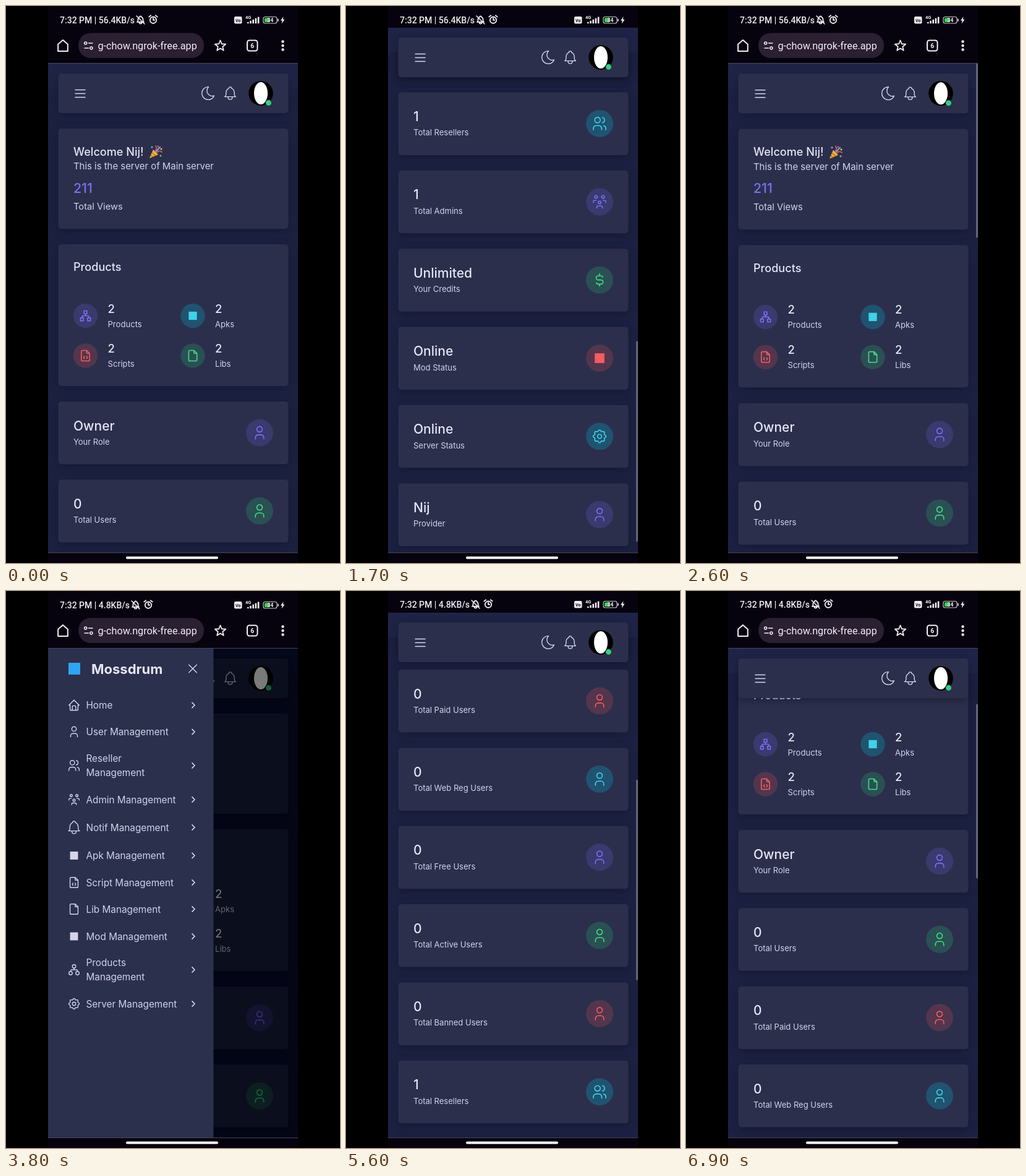
An HTML page that plays this animation: 540x900 px, repeating every 7 s.

```html
<!DOCTYPE html>
<html lang="en">
<head>
<meta charset="utf-8">
<title>Server dashboard</title>
<style>
  html, body { margin: 0; width: 100%; height: 100%; overflow: hidden; background: #000; }
  svg { display: block; }
  #stage { width: 100vw; height: 100vh; }
  text { font-family: Inter, "Open Sans", sans-serif; fill: #d2d2ea; }
  .system text { font-family: Roboto, sans-serif; fill: #f1edf5; }
  .title { fill: #e6e5f8; font-weight: 500; }
  .card { fill: #2b2f4b; filter: drop-shadow(0 3px 7px rgba(9, 11, 34, .45)); }
  .icon { fill: none; stroke-linecap: round; stroke-linejoin: round; }
</style>
</head>
<body>
<svg id="stage" viewBox="0 0 540 900"></svg>
<script>
const LOOP = 7000, STEP = 100;
const VIEW_TOP = 93, VIEW_BOTTOM = 883, BAR_HEIGHT = 58, CONTENT_HEIGHT = 2220;
const OWNER = 'Nij', BRAND = 'Mossdrum', LIGHT = '#d5d4ea';

const tones = {
  purple: ['#7a70f5', '#3a3a6e'],
  green: ['#43dd82', '#2a5054'],
  red: ['#f55c61', '#53364d'],
  cyan: ['#40d2ea', '#205370'],
};

const ring = (x, y, r) => `M${x - r} ${y}a${r} ${r} 0 1 0 ${2 * r} 0a${r} ${r} 0 1 0 ${-2 * r} 0`;
const polar = (count, radius, turn = 0) => 'M' + Array.from({ length: count }, (_, i) => {
  const a = i / count * 2 * Math.PI + turn, r = radius(i, a);
  return `${(12 + r * Math.cos(a)).toFixed(2)} ${(12 + r * Math.sin(a)).toFixed(2)}`;
}).join('L') + 'z';
const page = 'M14 3v4a1 1 0 0 0 1 1h4M17 21H7a2 2 0 0 1-2-2V5a2 2 0 0 1 2-2h7l5 5v11a2 2 0 0 1-2 2z';
const node = (x, y) => `M${x} ${y}h5v5h-5z`;
const branches = 'M6 15v-1a2 2 0 0 1 2-2h8a2 2 0 0 1 2 2v1M12 9v3';

// Line icons on a 24 unit grid
const icons = {
  user: ring(12, 7, 4) + 'M6 21v-2a4 4 0 0 1 4-4h4a4 4 0 0 1 4 4v2',
  users: ring(9, 7, 4) + 'M3 21v-2a4 4 0 0 1 4-4h4a4 4 0 0 1 4 4v2M16 3.1a4 4 0 0 1 0 7.8M21 21v-2a4 4 0 0 0-3-3.8',
  group: ring(12, 13, 2) + ring(17, 5, 2) + ring(7, 5, 2) +
    'M8 21v-1a2 2 0 0 1 2-2h4a2 2 0 0 1 2 2v1M17 10h2a2 2 0 0 1 2 2v1M3 13v-1a2 2 0 0 1 2-2h2',
  dollar: 'M16.7 8a3 3 0 0 0-2.7-2h-4a3 3 0 0 0 0 6h4a3 3 0 0 1 0 6h-4a3 3 0 0 1-2.7-2M12 3v3m0 12v3',
  gear: polar(64, (i, a) => 8.3 + Math.cos(8 * a)) + ring(12, 12, 3),
  file: page,
  code: page + 'M10 13l-1 2 1 2M14 13l1 2-1 2',
  sitemap: node(3.5, 15.5) + node(15.5, 15.5) + node(9.5, 3.5) + branches,
  hierarchy: ring(6, 18, 3) + ring(18, 18, 3) + ring(12, 6, 3) + branches,
  bell: 'M10 5a2 2 0 1 1 4 0a7 7 0 0 1 4 6v3a4 4 0 0 0 2 3H4a4 4 0 0 0 2-3v-3a7 7 0 0 1 4-6M9 17v1a3 3 0 0 0 6 0v-1',
  moon: 'M12 3h.4a7.5 7.5 0 0 0 7.9 12.4A9 9 0 1 1 12 3z',
  home: 'M5 12H3l9-9 9 9h-2M5 12v7a2 2 0 0 0 2 2h10a2 2 0 0 0 2-2v-7M9 21v-6a2 2 0 0 1 2-2h2a2 2 0 0 1 2 2v6',
  house: 'M5 10l7-6 7 6v10H5z',
  menu: 'M4 6h16M4 12h16M4 18h16',
  close: 'M18 6L6 18M6 6l12 12',
  chevron: 'M9 6l6 6-6 6',
  star: polar(10, i => i % 2 ? 4.2 : 9.5, -Math.PI / 2),
  alarm: ring(12, 13, 7) + 'M12 9v4h3M3 6l4-3M21 6l-4-3',
  tune: ring(6, 7, 2.5) + 'M12 7h8M4 17h8' + ring(17.5, 17, 2.5),
};

const icon = (name, x, y, scale = 1, color = LIGHT, width = 1.4) => name === 'square'
  ? `<rect x="${x - 7 * scale}" y="${y - 7 * scale}" width="${14 * scale}" height="${14 * scale}" fill="${color}"/>`
  : `<path class="icon" d="${icons[name]}" stroke="${color}" stroke-width="${width / scale}"
      transform="translate(${x} ${y}) scale(${scale}) translate(-12 -12)"/>`;
const text = (x, y, size, content, extra = '') =>
  `<text x="${x}" y="${y}" font-size="${size}" ${extra}>${content}</text>`;
const title = (x, y, size, content) => text(x, y, size, content, 'class="title"');
const rect = (x, y, w, h, fill, r = 0) =>
  `<rect x="${x}" y="${y}" width="${w}" height="${h}" rx="${r}" fill="${fill}"/>`;
const circle = (x, y, r, fill) => `<circle cx="${x}" cy="${y}" r="${r}" fill="${fill}"/>`;
const card = (y, h) => `<rect class="card" x="84.5" y="${y}" width="372" height="${h}" rx="5"/>`;
const badge = (name, tone, x, y, r, scale) =>
  circle(x, y, r, tones[tone][1]) + icon(name, x, y, scale, tones[tone][0], 1.6);

const popper = `<g transform="translate(231 225)">
  <path d="M1 21L7 7l8 8z" fill="#f0b73f"/><path d="M3 16l4 3M5 12l6 5" stroke="#b9672d" stroke-width="1.5"/>
  <path class="icon" d="M10 9c3-2 3-5 1-8M13 12c2-3 5-3 8-1" stroke="#e4505c" stroke-width="2"/>
  <path class="icon" d="M12 10l6-7" stroke="#58b7e8" stroke-width="2"/>
  ${circle(5, 3, 1.5, '#5fb8e6')}${circle(20, 6, 1.5, '#f2c94c')}${circle(19, 17, 1.5, '#63c37a')}${circle(15, 2, 1.2, '#e86a8a')}
</g>`;

const welcome = card(198, 162) + title(109, 241.5, 18.1, `Welcome ${OWNER}!`) + popper +
  text(109, 264, 14.9, 'This is the server of Main server') +
  text(109, 301.5, 21.3, '211', 'style="fill:#7a70f2;font-weight:500"') +
  text(109, 328.5, 14.7, 'Total Views');

const product = (x, y, name, tone, label) => badge(name, tone, x, y, 19.7, .95) +
  title(x + 36, y - 5, 18.5, '2') + text(x + 36, y + 18, 13.1, label);
const products = card(385, 229) + title(109, 428, 18.1, 'Products') +
  product(128.5, 500.5, 'sitemap', 'purple', 'Products') + product(302, 500.5, 'square', 'cyan', 'Apks') +
  product(128.5, 565, 'code', 'red', 'Scripts') + product(302, 565, 'file', 'green', 'Libs');

const stats = [
  ['Owner', 'Your Role', 'user'], ['0', 'Total Users', 'user'],
  ['0', 'Total Paid Users', 'user'], ['0', 'Total Web Reg Users', 'user'],
  ['0', 'Total Free Users', 'user'], ['0', 'Total Active Users', 'user'],
  ['0', 'Total Banned Users', 'user'], ['1', 'Total Resellers', 'users'],
  ['1', 'Total Admins', 'group'], ['Unlimited', 'Your Credits', 'dollar'],
  ['Online', 'Mod Status', 'square'], ['Online', 'Server Status', 'gear'],
  [OWNER, 'Provider', 'user'],
].map(([value, label, name], i) => {
  const y = 639 + i * 126.35, tone = ['purple', 'green', 'red', 'cyan'][i % 4];
  return card(y, 101.5) + title(109, y + 46.5, 21, value) + text(109, y + 70, 13, label) +
    badge(name, tone, 410, y + 50.5, 22, 1.12);
}).join('');

const header = rect(68, 93, 404, 40, '#1f2447') + card(109, 64) +
  icon('menu', 120, 141.5) + icon('moon', 327, 141, 1.15) + icon('bell', 362.5, 141, 1.12) +
  circle(412, 141, 19.8, '#000') + '<ellipse cx="412" cy="141" rx="11" ry="18" fill="#fff"/>' +
  circle(424.5, 156.5, 5.2, '#2b2f4b') + circle(424.5, 156.5, 4.4, '#35d07a');

const menuItem = ([name, y, ...lines]) =>
  icon(name, 110, y, name === 'bell' ? 1.12 : .92) + icon('chevron', 303, y, .68, LIGHT, 1.7) +
  lines.map((line, i) => text(129.5, y + 5.5 + (i - (lines.length - 1) / 2) * 22.5, 15.3, line)).join('');
const drawer = rect(68, 93, 267.5, 791, '#2b304c') + rect(101, 116, 19, 19, '#2fa4f4') +
  text(138, 133.5, 22, BRAND, 'style="font-weight:700;fill:#e6e5f8"') + icon('close', 302, 125.5, 1.05) + [
    ['home', 184.5, 'Home'],
    ['user', 227.5, 'User Management'],
    ['users', 282, 'Reseller', 'Management'],
    ['group', 337, 'Admin Management'],
    ['bell', 382, 'Notif Management'],
    ['square', 427.5, 'Apk Management'],
    ['code', 471, 'Script Management'],
    ['file', 514, 'Lib Management'],
    ['square', 558, 'Mod Management'],
    ['hierarchy', 612, 'Products', 'Management'],
    ['gear', 667, 'Server Management'],
  ].map(menuItem).join('');

const WHITE = '#f1edf5', DARK = '#06030e';
const toolbar = rect(68, 35, 404, 58, DARK) + rect(68, 92, 404, 1, '#46445c') +
  icon('house', 92, 64, 1.12, WHITE, 2) + rect(117, 43.5, 203, 40.5, '#2a2032', 20) +
  icon('tune', 133.5, 64, .8, WHITE, 1.6) + text(148.5, 69.8, 16.2, 'g-chow.ngrok-free.app') +
  icon('star', 346.5, 64.5, .95, WHITE, 1.8) +
  `<rect x="390" y="55.5" width="16.5" height="17" rx="3.5" fill="none" stroke="${WHITE}" stroke-width="2"/>` +
  text(398.2, 68, 10.5, '6', 'text-anchor="middle" font-weight="700"') +
  [57.5, 64, 70.5].map(y => circle(447.5, y, 2.2, WHITE)).join('');

const bars = [0, 1, 2, 3, 4].map(i => rect(390 + i * 4.2, 26 - i * 2.1, 2.6, 2.2 + i * 2.1, WHITE)).join('');
const statusBar = text(87, 28, 14, '', 'id="clock" font-weight="500"') +
  `<g id="alerts">${icon('bell', 217.5, 22.5, .68, WHITE, 1.8)}
    <path class="icon" d="M211 16l13 13" stroke="${WHITE}" stroke-width="1.6"/>
    ${icon('alarm', 238, 22, .75, WHITE, 1.8)}</g>` +
  rect(369, 17, 12.5, 11.5, WHITE, 2) +
  text(375.2, 25.5, 7, 'Vo', 'text-anchor="middle" font-weight="700" style="fill:#111"') +
  text(387, 21, 7.5, '4G', 'font-weight="700"') + bars +
  `<rect x="416" y="17.5" width="22" height="10.5" rx="3" fill="none" stroke="#c9c6d2" stroke-width="1.2"/>` +
  rect(418, 19.3, 8.5, 7, '#3fd256', 1.5) + rect(439, 20.5, 1.8, 4.5, '#c9c6d2', 1) +
  text(427.5, 26, 8.5, '34', 'text-anchor="middle" font-weight="700"') +
  `<path d="M448.5 17l-4.5 6.5h2.6l-.8 5 4.7-6.7h-2.8z" fill="${WHITE}"/>`;

const $ = id => document.getElementById(id);
$('stage').innerHTML = `
  <clipPath id="view"><rect id="viewRect" x="68" width="404"/></clipPath>
  ${rect(0, 0, 540, 900, '#000')}${rect(68, 0, 404, 900, DARK)}
  <g clip-path="url(#view)">
    <g id="backdrop">
      ${rect(68, 0, 404, 900, '#1d2141')}
      <g id="page"><g id="content">${welcome}${products}${stats}</g>${header}</g>
    </g>
    <rect id="thumb" x="469" width="3.2" rx="1" fill="#63677f"/>
    <g id="drawer">${drawer}</g>
  </g>
  <g class="system">
    <g id="toolbar">${toolbar}</g>
    ${rect(68, 0, 404, 35, DARK)}<g id="status">${statusBar}</g>
    ${rect(68, 883, 404, 1, '#46445c')}${rect(194, 889.5, 149, 4, '#fff', 2)}
  </g>`;

// Piecewise linear value over [time, value] points
function track(points, t) {
  const next = points.findIndex(p => p[0] > t);
  if (next < 0) return points.at(-1)[1];
  if (next === 0) return points[0][1];
  const [t0, v0] = points[next - 1], [t1, v1] = points[next];
  return v0 + (v1 - v0) * (t - t0) / (t1 - t0);
}

const scrollTrack = [[0, 0], [200, 80], [500, 390], [900, 850], [1300, 1200], [1700, 1326], [1800, 1326],
  [2000, 1050], [2300, 320], [2500, 0], [5200, 0], [5400, 220], [5700, 950], [5900, 1330], [6000, 1372],
  [6100, 1330], [6200, 1231], [6500, 780], [6900, 253]];
const barTrack = [[0, 0], [200, BAR_HEIGHT], [1750, BAR_HEIGHT], [1900, 0],
  [5200, 0], [5400, BAR_HEIGHT], [6000, BAR_HEIGHT], [6150, 0]];
const stretchTrack = [[2400, 1], [2500, 1.008], [2600, 1.0047], [2800, 1]];
const thumbTrack = [[0, 0], [100, 1], [2700, 1], [3000, 0], [5200, 0], [5300, 1]];
const drawerTrack = [[2800, 0], [3200, 1], [3800, 1], [4300, 0]];

function draw(t) {
  const scroll = track(scrollTrack, t);
  const bar = track(barTrack, t);
  const top = VIEW_TOP - bar, height = VIEW_BOTTOM - top;
  const open = 1 - (1 - track(drawerTrack, t)) ** 2;
  const fast = t < 3000;

  $('viewRect').setAttribute('y', top);
  $('viewRect').setAttribute('height', height);
  $('page').setAttribute('transform',
    `translate(0 ${top}) scale(1 ${track(stretchTrack, t)}) translate(0 ${-VIEW_TOP})`);
  $('content').setAttribute('transform', `translate(0 ${-scroll})`);
  $('toolbar').setAttribute('transform', `translate(0 ${-bar})`);

  $('thumb').setAttribute('y', top + scroll / CONTENT_HEIGHT * height);
  $('thumb').setAttribute('height', height * height / CONTENT_HEIGHT);
  $('thumb').setAttribute('opacity', track(thumbTrack, t));

  $('backdrop').style.filter = open
    ? `brightness(${1 - .52 * open}) contrast(${1 + .086 * open})` : 'none';
  $('drawer').setAttribute('transform', `translate(${(open - 1) * 268} 0)`);

  $('clock').textContent = `7:32 PM | ${fast ? '56.4' : '4.8'}KB/s`;
  $('alerts').setAttribute('transform', `translate(${fast ? 0 : -8} 0)`);
  $('status').setAttribute('transform', `translate(0 ${t < 3900 ? 0 : -1})`);
}

function tick() {
  draw(Math.floor(performance.now() % LOOP / STEP) * STEP);
  requestAnimationFrame(tick);
}
tick();
</script>
</body>
</html>
```
